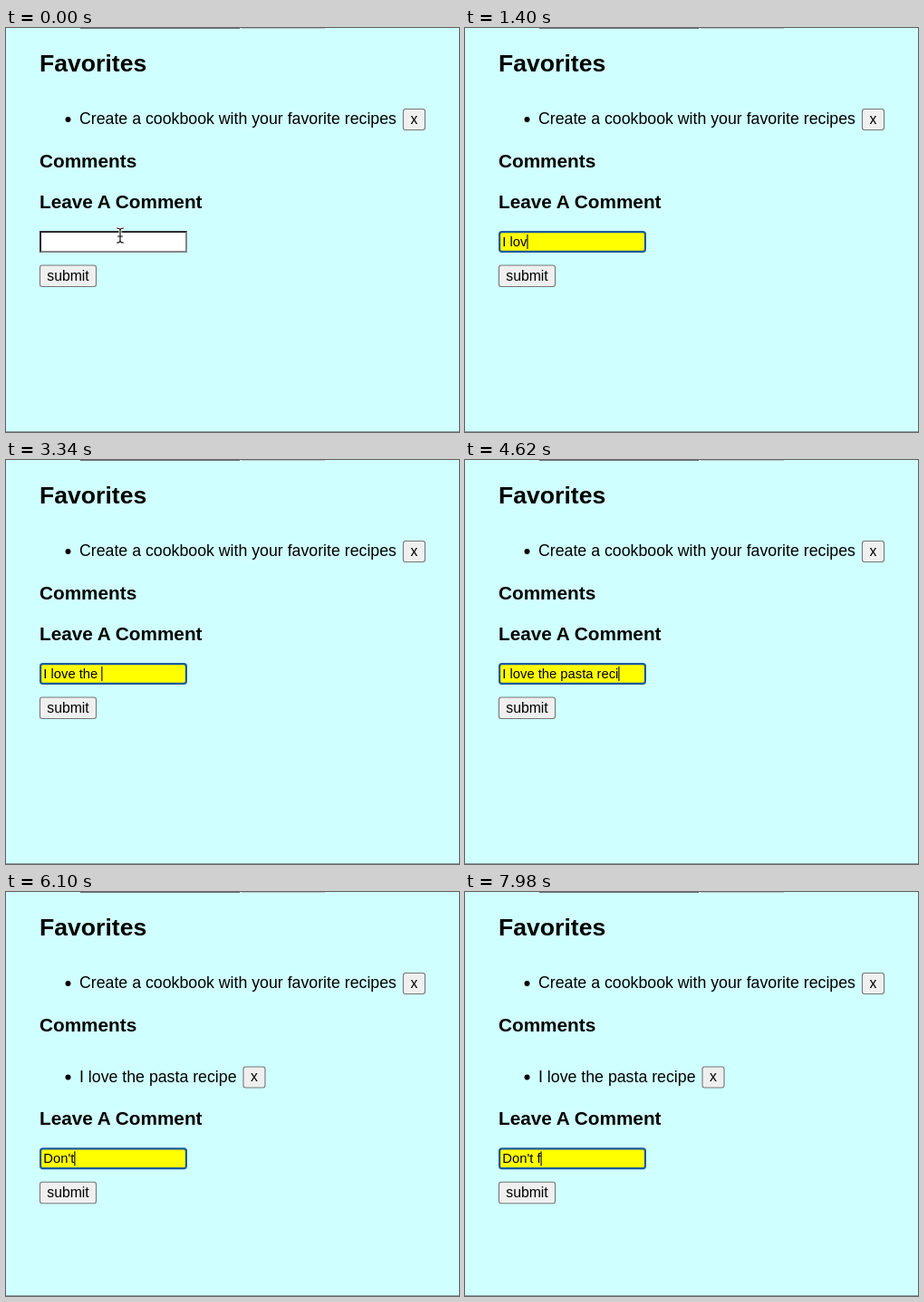
These frames come from a looping animation (500 by 446 pixels, 8000 ms). An HTML page:

```html
<!DOCTYPE html>
<html lang="en">
<head>
<meta charset="utf-8">
<title>Leave a comment</title>
<style>
  html, body { margin: 0; width: 100%; height: 100%; overflow: hidden; background: #cfffff; }
  svg { display: block; width: 500px; height: 446px; font: 17.74px "Liberation Sans", Arial, sans-serif; }
  text { white-space: pre; }
  .h2 { font-size: 26.6px; font-weight: bold; }
  .h3 { font-size: 20.75px; font-weight: bold; }
  .typed { font-size: 14.78px; }
  .button rect { fill: #efefef; stroke: #767676; stroke-width: 1.1; }
  .button text { font-size: 15.8px; text-anchor: middle; }
  .focus { fill: #ff0; stroke: #1d5a9c; stroke-width: 2.2; }
</style>
</head>
<body>
<svg viewBox="0 0 500 446">
  <rect width="500" height="446" fill="#cfffff"/>
  <rect x="82" width="176" height="1" fill="#6b7a7a"/>
  <rect x="260" width="92" height="1" fill="#b3cccc"/>
  <rect y="445" width="500" height="1" fill="#8fa3a3"/>

  <text class="h2" x="37" y="47.5">Favorites</text>
  <circle cx="68.5" cy="101" r="3"/>
  <text x="81" y="106">Create a cookbook with your favorite recipes</text>
  <g class="button">
    <rect x="438.5" y="89.5" width="24" height="23" rx="2.5"/>
    <text x="450.5" y="105.5">x</text>
  </g>

  <text class="h3" x="37" y="153.5">Comments</text>
  <g id="comment">
    <circle cx="68.5" cy="204.5" r="3"/>
    <text id="posted" x="81" y="209.5"></text>
    <g class="button">
      <rect x="262" y="193" width="24" height="23" rx="2.5"/>
      <text x="274" y="209">x</text>
    </g>
  </g>

  <g id="form">
    <text class="h3" x="37" y="198.5">Leave A Comment</text>
    <g id="idle">
      <path d="M37 224h163v24h-163z" fill="#858585"/>
      <path d="M37 224h163l-2 2h-159v20l-2 2z" fill="#2b2b2b"/>
      <path d="M39 226h159v20h-159z" fill="#fff"/>
    </g>
    <g id="active">
      <rect class="focus" x="38.1" y="225.1" width="160.8" height="21.8" rx="2.6"/>
      <text id="typed" class="typed" x="41.3" y="241" xml:space="preserve"></text>
      <rect id="caret" y="228" width="1.1" height="16"/>
    </g>
    <g class="button">
      <rect x="37.5" y="262" width="62" height="23.5" rx="2.5"/>
      <text x="68.5" y="279">submit</text>
    </g>
  </g>

  <g id="pointer" fill="none" stroke-linecap="round">
    <path id="beam" d="M122.5 221q3.5 0 3.5 2.5q0 -2.5 3.5 -2.5M126 223.5v11M123.5 230h5M122.5 237q3.5 0 3.5 -2.5q0 2.5 3.5 2.5" stroke="#fff" stroke-width="2.6"/>
    <use href="#beam"/>
    <path d="M122.5 221q3.5 0 3.5 2.5q0 -2.5 3.5 -2.5M126 223.5v11M123.5 230h5M122.5 237q3.5 0 3.5 -2.5q0 2.5 3.5 2.5" stroke="#111" stroke-width="1.2"/>
  </g>
</svg>
<script>
  const LOOP = 8000, FOCUS = 40, TYPING = 820, SUBMIT = 5220;
  const BACK = '\b', ENTER = '\n';
  const hiddenCaret = [[220, TYPING], [5280, 5740]];
  const keys = [
    [820, 'I'], [960, ' '], [1100, 'l'], [1260, 'o'], [1400, 'v'], [1520, 'e'], [1640, ' '],
    [1760, 't'], [1860, 'e'], [1960, 'h'], [2060, ' '], [2140, 'p'],
    [2340, BACK], [2520, BACK], [2580, BACK], [2620, BACK], [2660, BACK],
    [2800, 't'], [2840, 'h'], [3000, 'e'], [3340, ' '],
    [3480, 'p'], [3540, 'a'], [3600, 's'], [3740, 't'], [3840, 'a'], [3940, ' '],
    [4040, 'r'], [4140, 'e'], [4340, 'c'], [4620, 'i'], [4720, 'p'], [4780, 'e'],
    [SUBMIT, ENTER],
    [5740, 'D'], [5820, 'o'], [5900, 'n'], [6000, "'"], [6100, 't'], [6300, ' '],
    [6500, 'f'], [6580, 'o'], [6720, 'g'], [6840, 'e'],
    [7300, BACK], [7460, BACK], [7540, BACK], [7700, BACK], [7980, 'f']
  ];

  const $ = id => document.getElementById(id);
  const show = (id, on) => $(id).setAttribute('visibility', on ? 'visible' : 'hidden');

  function textAt(time) {
    let value = '', posted = '';
    for (const [at, key] of keys) {
      if (at > time) break;
      if (key === BACK) value = value.slice(0, -1);
      else if (key === ENTER) [posted, value] = [value, ''];
      else value += key;
    }
    return { value, posted };
  }

  function draw(time) {
    const { value, posted } = textAt(time);
    const focused = time >= FOCUS;
    const typed = $('typed');
    typed.textContent = value;
    $('posted').textContent = posted;
    $('caret').setAttribute('x', 41.3 + (value ? typed.getComputedTextLength() : 0));
    $('form').setAttribute('transform', `translate(0 ${posted ? 58.3 : 0})`);
    show('comment', posted);
    show('idle', !focused);
    show('active', focused);
    show('caret', focused && !hiddenCaret.some(([from, to]) => time >= from && time < to));
    show('pointer', time < TYPING);
  }

  const start = performance.now();
  function tick() {
    draw((performance.now() - start) % LOOP);
    requestAnimationFrame(tick);
  }
  tick();
</script>
</body>
</html>
```
